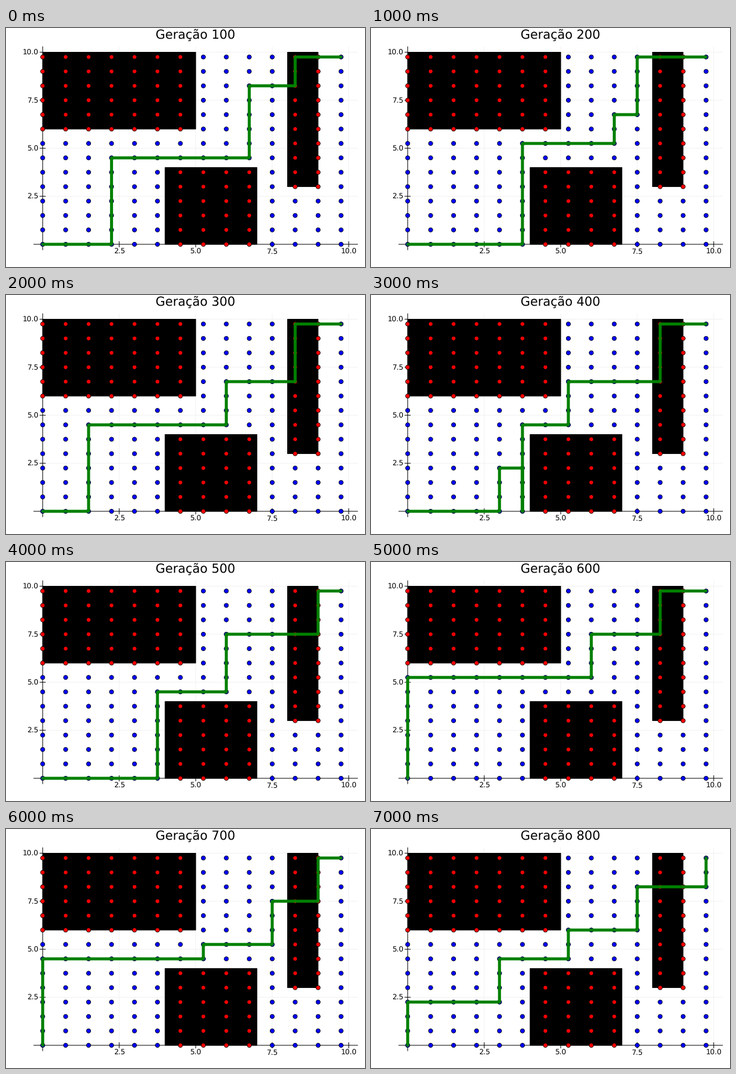
Recreate the animation shown at these times as a matplotlib script. Size 600 by 400 pixels, loop 8 s.

```python
import matplotlib.pyplot as plt
from matplotlib.animation import FuncAnimation
from matplotlib.patches import Rectangle

W, H, DPI = 600, 400, 100
PT = 72 / DPI  # points per pixel
STEP = 0.75    # spacing of the node grid
SIDE = 14
GOAL = (SIDE - 1, SIDE - 1)

plt.rcParams["font.family"] = "DejaVu Sans"
plt.rcParams["text.hinting"] = "none"

# Obstacles as (x0, y0, x1, y1) in data units
OBSTACLES = [(0, 6, 5, 10), (4, 0, 7, 4), (8, 3, 9, 10)]

# Best route per generation: steps right, up, right, ...; the rest leads to GOAL
ROUTES = [
    [3, 6, 6, 5, 2, 2],
    [5, 7, 4, 2, 1, 4],
    [2, 6, 6, 3, 3, 4],
    [4, 3, 1, -3, 0, 6, 2, 3, 4, 4],
    [5, 6, 3, 4, 4, 3],
    [0, 7, 8, 3, 3, 3],
    [0, 6, 7, 1, 3, 3, 2, 3],
    [0, 3, 4, 3, 3, 2, 3, 3, 3],
]


def px(x):
    return 61.3 + 51.15 * x


def py(y):
    return 362 - 32.15 * y


def blocked(x, y):
    return any(x0 <= x <= x1 and y0 <= y <= y1 for x0, y0, x1, y1 in OBSTACLES)


def corners(runs):
    pos = [0, 0]
    points = [tuple(pos)]
    for n, run in enumerate(runs):
        pos[n % 2] += run
        points.append(tuple(pos))
    return points + [GOAL]


fig = plt.figure(figsize=(W / DPI, H / DPI), dpi=DPI, facecolor="white")
ax = fig.add_axes([0, 0, 1, 1])
ax.set_xlim(0, W)
ax.set_ylim(H, 0)
ax.axis("off")


def line(xs, ys, color="black", z=2):
    ax.plot(xs, ys, color=color, lw=PT, solid_capstyle="butt",
            snap=False, zorder=z)


def label(x, y, text, size, align="center"):
    return ax.text(x, y, text, size=size * PT, ha=align, va="baseline")


def draw_axes():
    left, right, low, high = px(-0.3), px(10.3), py(-0.3), py(10.3)
    line([left, right], [py(0)] * 2)
    line([px(0)] * 2, [low, high])
    for v in (2.5, 5.0, 7.5, 10.0):
        x, y = px(v), py(v)
        line([x, x], [low, high], "#f2f2f2", 1)
        line([left, right], [y, y], "#f2f2f2", 1)
        line([x, x], [py(0) - 5, py(0) + 5])
        line([px(0) - 5, px(0) + 5], [y, y])
        label(x, 378, f"{v:.1f}", 12)
        label(54, y + 4.4, f"{v:.1f}", 12, "right")


def draw_obstacles():
    for x0, y0, x1, y1 in OBSTACLES:
        ax.add_patch(Rectangle((px(x0), py(y1)), px(x1) - px(x0),
                               py(y0) - py(y1), fc="black", ec="black",
                               lw=PT, snap=False, zorder=3))


def draw_nodes():
    nodes = [(i * STEP, j * STEP) for i in range(SIDE) for j in range(SIDE)]
    colors = ["red" if blocked(x, y) else "blue" for x, y in nodes]
    ax.scatter([px(x) for x, _ in nodes], [py(y) for _, y in nodes],
               s=(7.1 * PT) ** 2, c=colors, edgecolors="black",
               linewidths=0.8 * PT, zorder=4)


draw_axes()
draw_obstacles()
draw_nodes()
route, = ax.plot([], [], color="green", lw=5 * PT, solid_capstyle="round",
                 solid_joinstyle="round", snap=False, zorder=5)
title = label(317, 18, "", 20.8)


def update(k):
    points = corners(ROUTES[k])
    route.set_data([px(i * STEP) for i, _ in points],
                   [py(j * STEP) for _, j in points])
    title.set_text(f"Geração {100 * (k + 1)}")
    return route, title


anim = FuncAnimation(fig, update, frames=len(ROUTES), interval=1000,
                     repeat=True, repeat_delay=0, blit=False)
plt.show()
```
